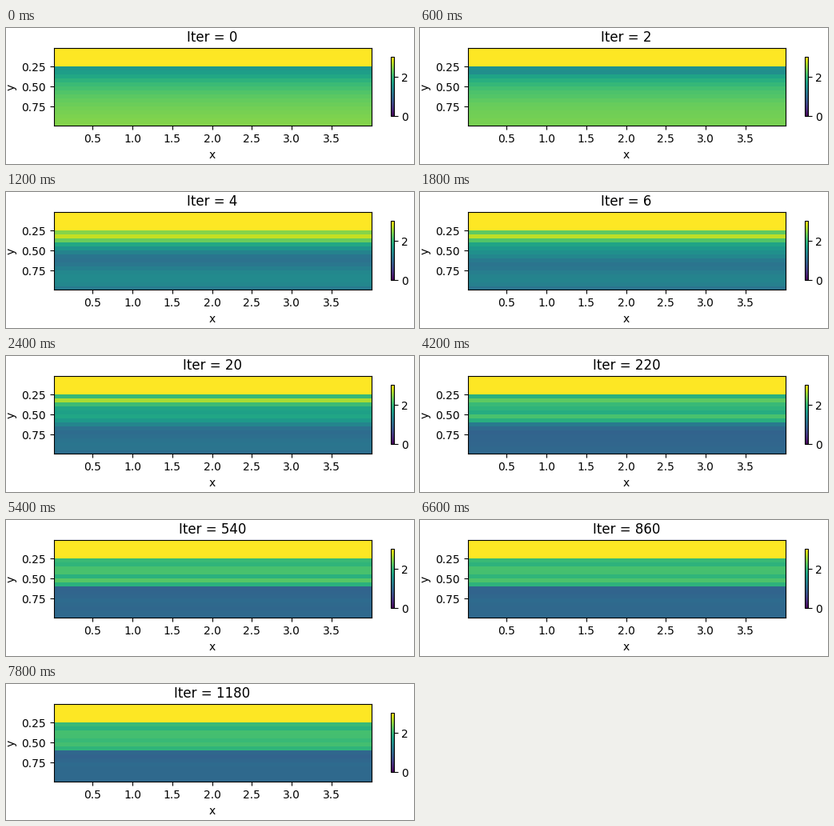
These frames come from a looping animation (510x170 px, 8000 ms). A matplotlib script:

```python
import numpy as np
import matplotlib.pyplot as plt
from matplotlib.animation import FuncAnimation

W, H, DPI = 510, 170, 100
STEP_TICKS = 3          # each picture is held for three 100 ms ticks
TICKS = 80
X_RANGE = (0.01, 4.0)
Y_RANGE = (0.02, 0.995)
WATER_BOTTOM = 0.26
LAYER = 0.05

# Layer values below the fixed top band, at a few steps of the inversion.
KEY_STEPS = [0, 2, 4, 6, 10, 18, 26]
PROFILES = np.array([
    [1.60, 1.68, 1.80, 1.94, 2.04, 2.12, 2.18, 2.24, 2.29, 2.33, 2.36, 2.39, 2.41, 2.43, 2.44],
    [1.52, 1.48, 1.74, 1.89, 2.00, 2.09, 2.16, 2.20, 2.26, 2.30, 2.33, 2.35, 2.36, 2.38, 2.38],
    [2.45, 2.74, 2.32, 1.80, 1.54, 1.34, 1.17, 1.13, 1.19, 1.29, 1.39, 1.44, 1.44, 1.39, 1.22],
    [2.25, 2.70, 2.18, 1.75, 1.60, 1.50, 1.39, 1.24, 1.16, 1.19, 1.28, 1.34, 1.35, 1.31, 1.16],
    [1.78, 2.54, 1.94, 1.76, 1.82, 2.05, 1.86, 1.48, 1.10, 0.92, 0.90, 0.94, 0.98, 1.00, 1.00],
    [2.02, 1.96, 2.13, 2.14, 1.90, 2.22, 1.92, 0.96, 0.98, 1.00, 1.05, 1.02, 1.00, 1.02, 1.02],
    [2.02, 1.92, 2.12, 2.10, 2.02, 2.10, 1.96, 1.00, 0.96, 1.00, 1.05, 1.03, 1.02, 1.03, 1.03],
])

depth = np.linspace(*Y_RANGE, 976)[:-1] + 0.0005
layer_of_row = np.floor((depth - WATER_BOTTOM) / LAYER).astype(int)


def iteration(step):
    if step <= 6:
        return step
    if step <= 12:
        return 10 * (step - 6)
    return 60 + 80 * (step - 12)


def model(step):
    layers = [np.interp(step, KEY_STEPS, column) for column in PROFILES.T]
    rows = np.take(layers, np.clip(layer_of_row, 0, len(layers) - 1))
    return np.where(layer_of_row < 0, 3.0, rows)[:, None]


def add_axes(left, top, right, bottom):
    return fig.add_axes([left / W, 1 - bottom / H, (right - left) / W, (bottom - top) / H])


# The small margin keeps the pixel size from being rounded down.
fig = plt.figure(figsize=((W + 0.01) / DPI, (H + 0.01) / DPI), dpi=DPI, facecolor="white")
ax = add_axes(59.5, 25.5, 456.5, 122.5)
image = ax.imshow(model(0), cmap="viridis", vmin=0, vmax=3, aspect="auto",
                  interpolation="nearest", extent=(*X_RANGE, *Y_RANGE[::-1]))
ax.set_xticks(np.arange(0.5, 4, 0.5))
ax.set_yticks([0.25, 0.5, 0.75])
ax.set_xlabel("x")
ax.set_ylabel("y")
title = ax.set_title("Iter = 0")
fig.colorbar(image, cax=add_axes(480.8, 36.5, 484.5, 110.5), ticks=[0, 2])


def update(tick):
    step = tick // STEP_TICKS
    image.set_data(model(step))
    title.set_text(f"Iter = {iteration(step)}")
    return image, title


anim = FuncAnimation(fig, update, frames=TICKS, interval=100, repeat=True, repeat_delay=0)
plt.show()
```
